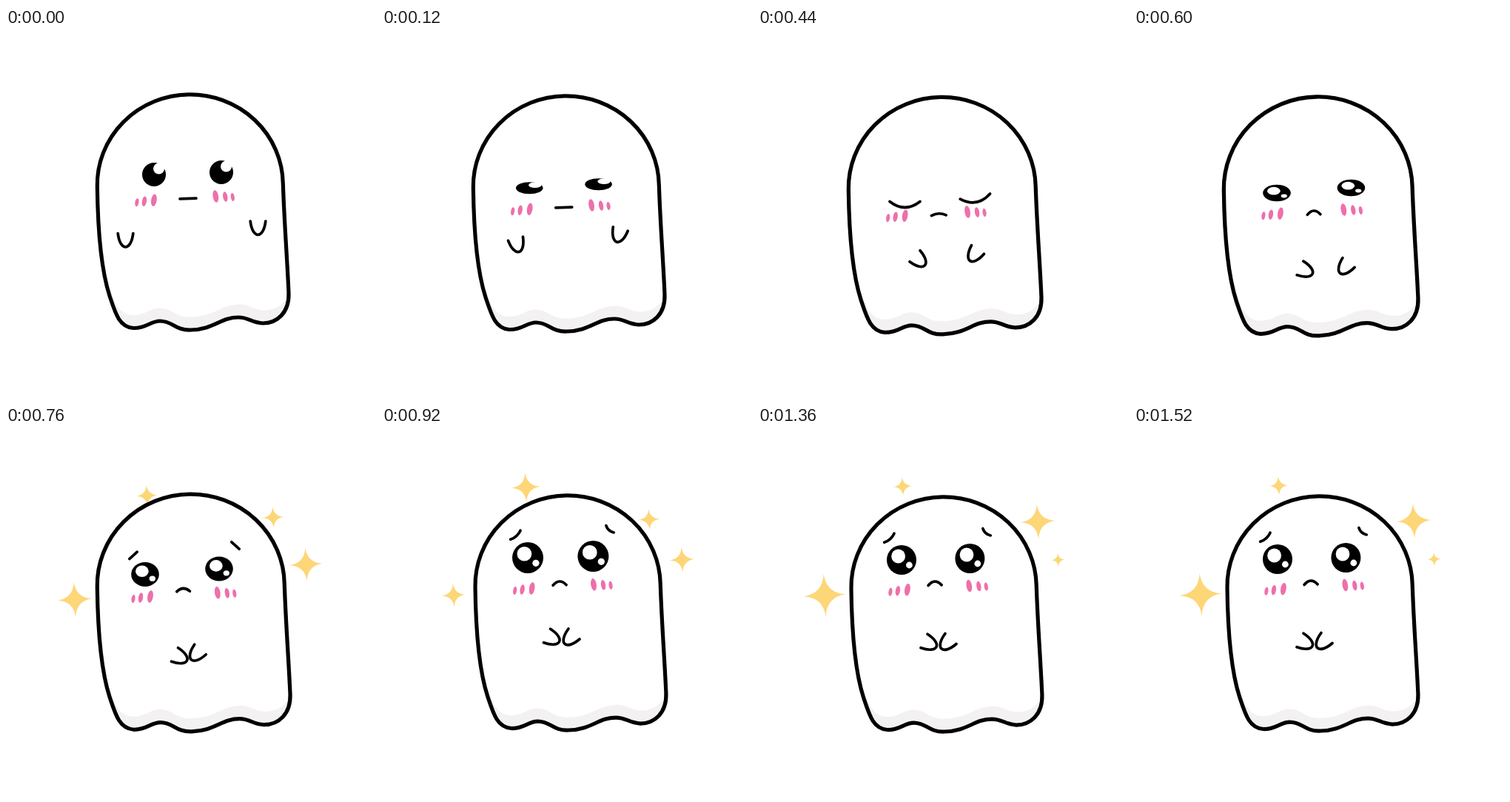
An HTML page that plays this animation: 500x500 px, repeating every 1840 ms.

```html
<!DOCTYPE html>
<html lang="en">
<head>
<meta charset="utf-8">
<title>Pleading ghost</title>
<style>
  html, body { margin: 0; width: 100%; height: 100%; overflow: hidden; background: #fff; }
  svg { display: block; width: 100%; height: 100%; }
</style>
</head>
<body>
<svg id="stage" viewBox="0 0 500 500"></svg>
<script>
const INK = '#000', PINK = '#ee6fab', GOLD = '#fdd677', SHADE = '#f3f1f2';
const SIDES = [-1, 1];
const BODY = 'M123.3 214 A125.4 122 0 0 1 374.3 210 C376 262 380 312 382 358 ' +
  'C383 385 366 399 347 399 C331 398 328 391 314 391 C290 391 282 407 250 408 ' +
  'C228 409 226 396 208 396 C195 396 190 406 172 405.5 C153 404 148 386 140 362 C128 325 124 270 123.3 214Z';

// body: shift and scale; face: cheek shift and spread; mouth: centre, half width, sag;
// eyes: midpoint, half gap, tilt, radii; arms: left and right hook with turn.
const calm = {
  body: [0, 0, 1], face: [0, 0, 0], mouth: [246, 230.5, 11, 0],
  eyes: [245.5, 196.5, 45.5, 1.5, 16, 16],
  arms: [[161.5, 277.5, 0], [340.5, 261, 0]]
};
const shut = {
  body: [0, 4, 1], face: [-.5, 24, 0], mouth: [245.5, 254.5, 11, 0],
  eyes: [246.3, 231, 47.8, 3.5, 20.5, 0],
  arms: [[199.5, 292, -29], [304, 282, 31]]
};
const squint = {
  body: [0, 5.5, 1.015], face: [-1, 18, 1], mouth: [243, 249.5, 8.8, -5], sad: true,
  eyes: [243.2, 219.5, 50.2, 3.5, 18.8, 11.3],
  arms: [[224.5, 324.5, -65], [290, 317, 38]]
};
const plead = {
  body: [1, 3.5, 1.008], face: [-1.2, -2.2, 3.7], mouth: [239.5, 221.5, 8.8, -4], sad: true,
  eyes: [238, 196.7, 50, 3.7, 18.8, 16.5], brow: 0,
  arms: [[228, 309, -64], [262.5, 302, 41]],
  rise: 0, stars: [13.5, 13.5, 21, 22]
};
const beg = {
  body: [2.3, 3.5, .997], face: [2.7, -13.2, 0], mouth: [240, 212.5, 9, -5], sad: true,
  eyes: [241.2, 177, 44.2, 1, 21, 21], brow: 2,
  arms: [[223, 283.5, -64], [259.5, 281, 43]],
  rise: 7, stars: [18.5, 13.5, 16, 15]
};
const settle = {
  ...beg, face: [2, -13.5, 0], mouth: [239, 210.7, 9, -5],
  eyes: [240.2, 178, 46.2, 1, 20, 20],
  arms: [[224.5, 288.5, -64], [260.5, 285.5, 43]],
  rise: 9, stars: [12, 22, 8.5, 27]
};

const mid = (a, b) => Array.isArray(a) ? a.map((v, i) => mid(v, b[i])) : (a + b) / 2;
const between = (a, b) =>
  Object.fromEntries(Object.keys(a).map(key => [key, mid(a[key], b[key])]));

const scenes = [
  [120, calm],
  [160, between(calm, shut)],
  [160, shut],
  [160, { ...between(shut, squint), eyes: shut.eyes }],
  [160, squint],
  [160, plead],
  [240, beg],
  [200, settle],
  [160, { ...settle, drop: 2 }],
  [320, { ...settle, drop: 1 }]
];
const LOOP = scenes.reduce((sum, [length]) => sum + length, 0);

const ellipse = (x, y, rx, ry, fill, turn = 0) =>
  `<ellipse cx="${x}" cy="${y}" rx="${rx}" ry="${ry}" fill="${fill}" transform="rotate(${turn} ${x} ${y})"/>`;
const line = (x, y, turn, d) =>
  `<path transform="translate(${x} ${y}) rotate(${turn})" d="${d}" fill="none" stroke="${INK}"
    stroke-width="3.7" stroke-linecap="round"/>`;
const bow = (x, y, half, sag, turn) =>
  line(x, y, turn, `M${-half} ${-sag / 2}Q0 ${sag * 1.5} ${half} ${-sag / 2}`);
const hook = ([x, y, turn]) => line(x, y, turn, 'M-10.3 0C-7.5 24.5 7.5 24.5 10.3 0');

function ghost([dx, dy, scale]) {
  return `<g transform="translate(${252.5 + dx} ${250 + dy}) scale(${scale}) translate(-252.5 -250)">
    <clipPath id="inside"><path d="${BODY}"/></clipPath>
    <path d="${BODY}" fill="${SHADE}"/>
    <g clip-path="url(#inside)"><path d="${BODY}" fill="#fff" transform="translate(-5 -17.5) scale(1.02 1)"/>
    <rect width="500" height="300" fill="#fff"/></g>
    <path d="${BODY}" fill="none" stroke="${INK}" stroke-width="5.2" stroke-linejoin="round"/></g>`;
}

function blush([dx, dy, spread]) {
  return SIDES.map(side => [0, 1, 2].map(i => {
    const x = 241.6 + dx + side * (41.7 + spread + 14.5 * i - 1.5 * i * i);
    const y = 230.1 + dy - side * 2.6 + i * (1 - side / 2);
    const ry = 8.3 * .82 ** i;
    return ellipse(x, y, ry * .45, ry, PINK, -9 * side);
  }).join('')).join('');
}

function eyes({ eyes: [cx, cy, gap, tilt, rx, ry], sad, brow }) {
  const glints = sad ? [[-.22, -.25, .47], [.52, .35, .22]] : [[.41, -.5, .47]];
  return SIDES.map(side => {
    const x = cx + side * gap, y = cy - side * tilt;
    if (!ry) return bow(x, y + 4, rx, 8, -5 - 5 * side);
    const arch = brow === undefined ? ''
      : bow(x + 3 + side * 19, y - ry - 12 - side * 3, 7 + (1 - side) * brow / 2, brow, side * 42);
    return ellipse(x, y, rx, ry, INK) + arch +
      glints.map(([u, v, r]) => ellipse(x + u * rx, y + v * ry, r * rx, r * ry, '#fff')).join('');
  }).join('');
}

// Each spot: position, drift as the stars rise, sideways shift as one swells.
const SPOTS = [
  [190.5, 94, .55, -1.6, 0], [334, 123.5, 0, .4, 2],
  [405.5, 187, 0, -.9, 0], [105, 234.5, 0, -.85, -.55]
];
function sparkle({ stars = [], rise }) {
  return stars.map((size, i) => {
    const [x, y, dx, dy, swell] = SPOTS[i];
    return `<path transform="translate(${x + dx * rise + swell * size} ${y + dy * rise}) rotate(-3) scale(${size * 1.06})"
      fill="${GOLD}" d="M0 -1Q.09 -.09 1 0Q.09 .09 0 1Q-.09 .09 -1 0Q-.09 -.09 0 -1Z"/>`;
  }).join('');
}

const draw = pose => `<g transform="translate(0 ${pose.drop || 0})">` +
  sparkle(pose) + ghost(pose.body) + blush(pose.face) + eyes(pose) +
  bow(...pose.mouth, -2) + pose.arms.map(hook).join('') + '</g>';

const stage = document.getElementById('stage');
const began = performance.now();
let shown;

function update(now) {
  let t = Math.max(0, now - began) % LOOP;
  const [, pose] = scenes.find(([length]) => (t -= length) < 0);
  if (pose !== shown) stage.innerHTML = draw(shown = pose);
}
function tick(now) {
  update(now);
  requestAnimationFrame(tick);
}
update(began);
requestAnimationFrame(tick);
</script>
</body>
</html>
```
